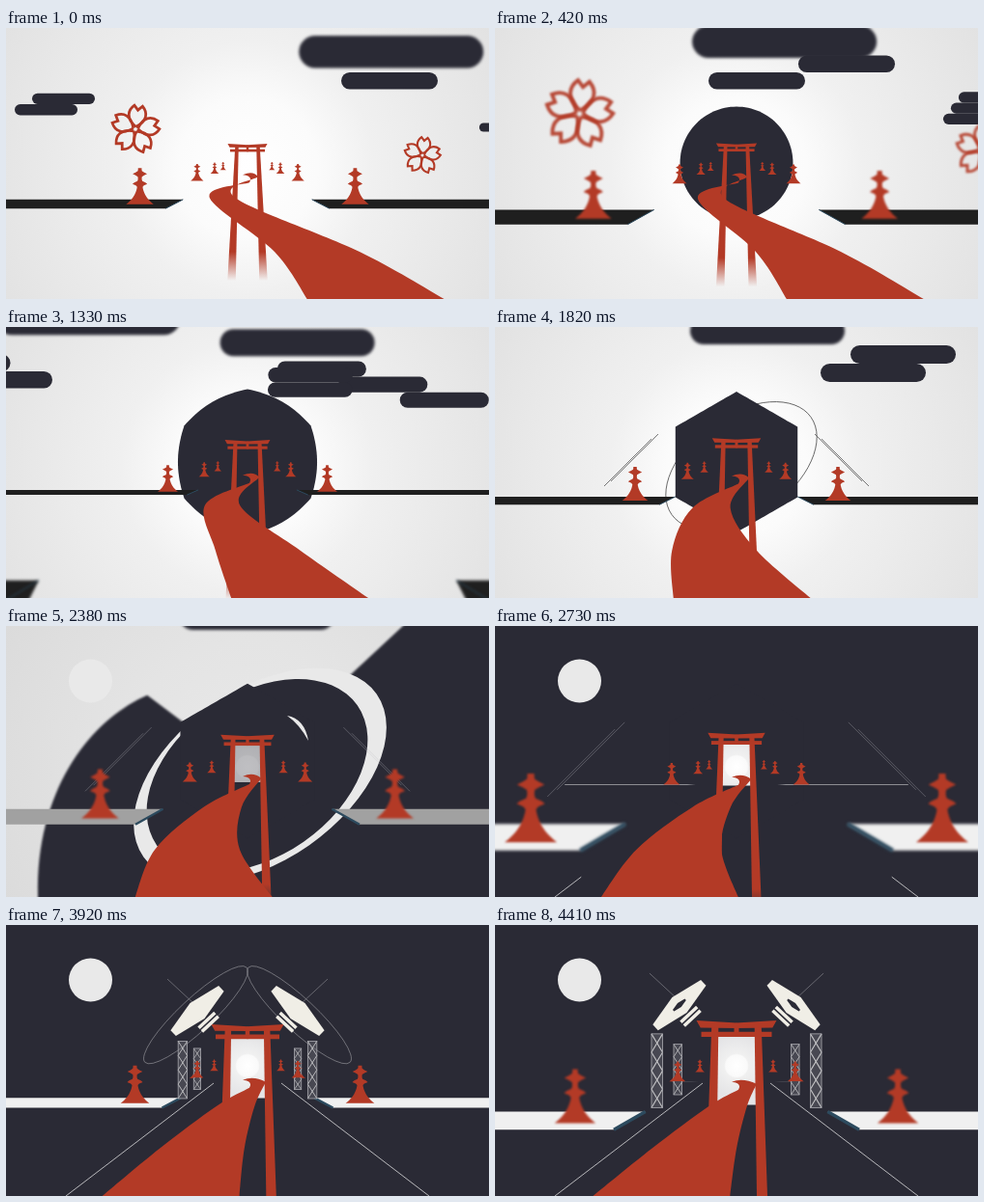
Write an HTML page with a canvas that moves like this. It is 500x281 px and loops after 4.48 s.

```html
<!DOCTYPE html>
<html lang="en">
<head>
<meta charset="utf-8">
<title>Torii road</title>
<style>
html, body { margin: 0; width: 100%; height: 100%; overflow: hidden; background: #e6e6e6 }
canvas { display: block }
</style>
</head>
<body>
<canvas id="stage" width="500" height="281"></canvas>
<script>
const c = document.getElementById('stage').getContext('2d');
const LOOP = 4480, STEP = 70, CX = 250, CY = 137, DEG = Math.PI / 180;
const RED = '#b33a26', DARK = '#2a2a35', CREAM = '#f0eee6';

const clamp = v => Math.max(0, Math.min(1, v));
const ramp = (t, from, to) => clamp((t - from) / (to - from));
const ease = (t, from, to) => ramp(t, from, to) ** 2 * (3 - 2 * ramp(t, from, to));
const mix = (a, b, k) => a + (b - a) * k;
const grey = (v, alpha = 1) => `rgba(${v},${v},${v},${alpha})`;

function poly(points, fill) {
  c.beginPath();
  points.forEach(p => c.lineTo(...p));
  c.closePath();
  c.fillStyle = fill;
  c.fill();
}

function line(x1, y1, x2, y2, color, width = 1) {
  c.beginPath();
  c.moveTo(x1, y1);
  c.lineTo(x2, y2);
  c.strokeStyle = color;
  c.lineWidth = width;
  c.stroke();
}

function oval(x, y, a, b, turn, fill) {
  c.beginPath();
  c.ellipse(x, y, a, b, turn, 0, 7);
  c.fillStyle = fill;
  c.fill();
}

function both(draw) {
  draw();
  c.save();
  c.translate(500, 0);
  c.scale(-1, 1);
  draw();
  c.restore();
}

function glow(y, r, stops) {
  const g = c.createRadialGradient(CX, y, 0, CX, y, r);
  stops.forEach(([k, color]) => g.addColorStop(k, color));
  return g;
}

// Smooth curve through the points, continuing the current path.
function through(p) {
  for (let i = 0; i < p.length - 1; i++) {
    const a = p[i - 1] || p[i], b = p[i], d = p[i + 1], e = p[i + 2] || d;
    c.bezierCurveTo(b[0] + (d[0] - a[0]) / 6, b[1] + (d[1] - a[1]) / 6,
      d[0] - (e[0] - b[0]) / 6, d[1] - (e[1] - b[1]) / 6, ...d);
  }
}

function drawGround(t) {
  const dim = ramp(t, 1850, 2350);
  c.fillStyle = glow(145, 290, [[0, grey(mix(255, 232, dim))], [.25, grey(mix(251, 230, dim))],
    [.45, grey(mix(240, 228, dim))], [1, grey(mix(226, 219, dim))]]);
  c.fillRect(0, 0, 500, 281);
}

// Banks of pills stacked upwards; each stands at x, y at the time `seen`.
const banks = [
  { seen: 0, x: 9, y: 79, w: 65, rows: 2, shift: 18, drift: -.3, grow: 0 },
  { seen: 840, x: 105, y: -13, w: 191, rows: 1, shift: 0, drift: -.236, grow: 0 },
  { seen: 840, x: 95, y: 46, w: 100, rows: 2, shift: 30, drift: -.3, grow: 0 },
  { seen: 840, x: 438, y: 79, w: 77, rows: 3, shift: -25, drift: -.137, grow: .0004 },
  { seen: 1820, x: 337, y: 38, w: 109, rows: 2, shift: 31, drift: .1, grow: .0004 },
  { seen: 1820, x: 202, y: -10, w: 160, rows: 1, shift: 0, drift: -.04, grow: 0 }
];

function drawClouds(t) {
  c.lineCap = 'round';
  for (const b of banks) {
    const dt = t - b.seen, s = 1 + dt * b.grow, h = .175 * b.w;
    if (dt < -900 || dt > 600) continue;
    c.filter = `blur(${h > 25 ? 1.4 : .6}px)`;
    for (let i = 0; i < b.rows; i++) {
      const x = CX + (b.x + i * b.shift - CX) * s + b.drift * dt * (1 + i / 2);
      const y = CY + (b.y + h / 2 - i * h - CY) * s - (b.rows < 2 ? dt * .025 : 0);
      line(x + h * s / 2, y, x + (b.w - h / 2) * s, y, DARK, h * s);
    }
  }
  c.filter = 'none';
  c.lineCap = 'butt';
}

// Thin outline that thickens to a band and bursts past the stage.
function drawRing(t) {
  if (t < 1400 || t > 2800) return;
  const p = (t - 1820) / 560, a = 88 * Math.exp(.515 * p ** 3), b = .6 * a;
  const x = 255 + 8 * p, y = 144 + 11 * p, turn = -35 * DEG;
  if (t < 2100) {
    c.beginPath();
    c.ellipse(x, y, a, b, turn, 0, 6.3 * ramp(t, 1400, 1750));
    c.strokeStyle = '#444';
    c.lineWidth = .8;
    c.stroke();
    return;
  }
  const k = ramp(t, 2100, 2380);
  oval(x, y, a, b, turn, '#e9e9e9');
  oval(x - 3, y, a * mix(.5, .86, k), b * mix(.5, .95, k), turn, DARK);
}

// Dark spiral that turns clockwise and swallows the light ground.
function drawNight(t) {
  if (t < 2200) return;
  const q = t - 2380, end = Math.min(360, 260 + q * .9), points = [[CX, 150]];
  for (let a = 0; a <= end; a += 2) {
    const r = 130 * Math.exp((end - a) * .0098) + Math.max(0, q) * 1.1, turn = (a - 43) * DEG;
    points.push([CX + r * Math.cos(turn), 150 + r * Math.sin(turn)]);
  }
  c.filter = 'blur(.8px)';
  poly(points, DARK);
  c.filter = 'none';
}

// Disc that straightens into a hexagon.
function drawCore(t) {
  if (t < 250 || t > 2800) return;
  const size = (1 - (1 - ramp(t, 250, 700)) ** 3) * (1 + .1 * ramp(t, 1820, 2380));
  const k = ramp(t, 1150, 1650), points = [];
  for (let a = 0; a < 360; a += 3) {
    const flat = 73 * Math.cos(30 * DEG) / Math.cos((a % 60 - 30) * DEG);
    const r = size * mix(77, flat, k), turn = (a - 90) * DEG;
    points.push([CX + r * Math.cos(turn), 140 + r * Math.sin(turn)]);
  }
  poly(points, DARK);
}

function drawMoon(t) {
  const r = 22.5 * ramp(t, 2170, 2350);
  oval(87.5, 57, r, r, 0, '#e9e9e9');
  if (t > 2300 && t < 2460) {
    c.beginPath();
    c.moveTo(291, 93);
    c.quadraticCurveTo(309, 96, 313, 119);
    c.quadraticCurveTo(304, 102, 291, 93);
    c.fill();
  }
}

function drawStreaks(t) {
  if (t > 1500 && t < 3900) {
    const s = 1 / (1 - (t - 1820) * .00033), l = 49 * ramp(t, 1500, 1750);
    const color = t < 2240 ? '#555' : 'rgba(190,190,195,.4)';
    both(() => {
      for (const [x, y] of [[-137, 28], [-130, 23]])
        line(CX + x * s, CY + y * s, CX + (x + l) * s, CY + (y - l) * s, color, t < 2900 ? .8 : 2.2);
    });
  }
  const reach = ramp(t, 2600, 3330);
  if (reach) both(() => line(62, 281, 62 + 153 * reach, 281 - 117 * reach, '#c9c9cb', .9));
}

// Sideways distance of a roadside thing at depth u.
const spread = u => 1 / (.0102 * u);

// Stone lantern: flared foot, two bulges for lamp and roof.
function drawLantern(d) {
  const h = .335 * d, x = CX - d, y = CY + .41 * d - h, right = [], left = [];
  for (let v = 0; v <= 1.001; v += .04) {
    const bulge = m => .15 * Math.exp(-(((v - m) / .045) ** 2));
    const w = (.05 + .33 * v ** 4 + bulge(.16) + bulge(.43)) * h;
    right.push([x + w, y + v * h]);
    left.unshift([x - w, y + v * h]);
  }
  c.filter = d > 130 ? `blur(${d * .006}px)` : 'none';
  poly([...right, ...left], RED);
  c.filter = 'none';
}

// Platform under a lantern: its upper edge lies a little deeper than the front one.
function drawLedge(u, t) {
  if (u > 1.62) return;
  const d = spread(u), back = spread(u + .12), night = ramp(t, 2200, 2490);
  const x1 = CX - .68 * back, x2 = CX - .76 * d, top = 140 + .386 * back;
  const h = (.45 * d - 3 - .386 * back) * Math.max(.15, clamp((1.6 - u) / .4));
  const out = Math.max(-20, x1 - (1.62 - u) * 850);
  if (d > 180) c.filter = 'blur(1.5px)';
  poly([[out, top], [x1, top], [Math.max(out, x2), top + h], [out, top + h]],
    grey(mix(31, 240, night), u > 1.4 ? .5 : 1));
  if (u < 1.3) line(x1, top, x2, top + h, '#2c4a5e', mix(1, .02 * d, night));
  c.filter = 'none';
}

function drawRoadside(t) {
  for (let i = t > 2500 ? 4 : 3; i >= 0; i--) {
    const u = .88 + i - .00052 * t;
    if (u > .12) both(() => {
      drawLedge(u, t);
      drawLantern(spread(u));
    });
  }
}

function drawPanels(t) {
  const k = ramp(t, 3500, 3800);
  if (!k) return;
  both(() => {
    for (const depth of [.0192, .0149]) {
      const d = 1 / (depth - (t - 3920) * 5.6e-6), w = .14 * d, x = CX - d - w / 2;
      const bottom = 138 + .625 * d, h = (bottom - 154 + .5 * d) * k, y = bottom - h;
      c.fillStyle = '#484852';
      c.fillRect(x, y, w, h);
      for (let i = 0; i < 4; i++) {
        const a = y + h * i / 4, b = a + h / 4;
        line(x, a, x + w, b, '#c5c5c7', d / 75);
        line(x + w, a, x, b, '#c5c5c7', d / 75);
      }
      c.strokeStyle = '#aaaab0';
      c.lineWidth = .8;
      c.strokeRect(x, y, w, h);
      if (depth > .015) drawLantern(d);
    }
  });
}

function drawWings(t) {
  const k = ramp(t, 3430, 3780), q = t - 3920;
  if (!k) return;
  const plate = (s, fill) => poly([[-34, 4], [0, 11], [34, 4], [34, -4], [0, -11], [-34, -4]]
    .map(([x, y]) => [x * s, y * s]), fill);
  both(() => {
    c.save();
    c.translate(198 - q * .0145, 89 - q * .0122);
    c.scale(k, k);
    line(-31, -33, -4, -8, '#77777e', .8);
    c.rotate(-43 * DEG);
    c.beginPath();
    c.ellipse(-4, 2, 72 + q / 16, 17 + q / 60, 0, 0, 7);
    c.strokeStyle = `rgba(160,160,165,${.7 * (1 - ramp(q, 30, 330))})`;
    c.lineWidth = .8;
    c.stroke();
    plate(1, CREAM);
    plate(.25 * ramp(q, 30, 380), DARK);
    for (const y of [14, 19]) line(-11, y, 12, y, CREAM, 3.5);
    c.restore();
  });
}

function drawGate(t, w) {
  const y = 140.5 - w, foot = 262 + t * .015, bar = (half, from, to) =>
    poly([[CX - half * w, y + from * w], [CX + .5, y + from * w], [CX + .5, y + to * w], [CX - half * w, y + to * w]], RED);
  c.globalAlpha = ramp(t, 2100, 2500);
  poly([[CX - .48 * w, y + .4 * w], [CX + .48 * w, y + .4 * w],
    [CX + .52 * w, 112 + 1.8 * w], [CX - .52 * w, 112 + 1.8 * w]],
    glow(146, 32, [[0, '#fff'], [.35, '#fafafa'], [.4, '#f0f0f0'], [1, '#e4e4e6']]));
  c.globalAlpha = 1;
  const fade = c.createLinearGradient(0, foot - 30, 0, foot);
  fade.addColorStop(0, RED);
  fade.addColorStop(1, 'rgba(179,58,38,0)');
  both(() => {
    poly([[CX - .62 * w, y + .1 * w], [CX - .45 * w, y + .1 * w],
      [CX - .45 * w - 3, foot], [CX - .62 * w - 8, foot]], fade);
    poly([[CX - w, y], [CX + .5, y + .06 * w], [CX + .5, y + .19 * w], [CX - .9 * w, y + .18 * w]], RED);
    bar(.88, .28, .41);
    bar(.06, .15, .3);
  });
}

// Winding road: three bends swing one after another, the width follows the depth.
function drawRoad(t, w) {
  const late = ease(t, 3000, 4300);
  const bends = [
    [224 + 17 * late, 176 + 12 * ease(t, 0, 2000)],
    [322 - 132 * ease(t, 0, 2800) + 16 * late, 232],
    [385 - 222 * ease(t, 0, 3300) + 8 * late, 283]
  ];
  const edge = side => bends.map(([x, y]) => [x + side * .55 * (y - 152), y]);
  const left = edge(-1).reverse(), y = 143 + .5 * w, tip = [251 + .48 * w, y + 1];
  c.beginPath();
  c.moveTo(245, y - 1);
  c.quadraticCurveTo(256, y - 6, ...tip);
  through([tip, ...edge(1)]);
  c.lineTo(...left[0]);
  through([...left, [252, y + 7]]);
  c.quadraticCurveTo(256, y, 245, y - 1);
  c.fillStyle = RED;
  c.fill();
}

function drawFlower(t, x, y, r) {
  const s = .88 / (.88 - .0006 * t);
  c.save();
  c.translate(CX + (x - CX) * s, 145 + (y - 145) * s);
  c.rotate(.13);
  c.scale(r * s, r * s);
  c.filter = t > 200 ? `blur(${s * .6}px)` : 'none';
  c.strokeStyle = RED;
  c.globalAlpha = 1 - .25 * ramp(t, 200, 800);
  c.lineWidth = .11;
  for (let i = 0; i < 5; i++) {
    c.rotate(72 * DEG);
    c.beginPath();
    c.moveTo(0, -.1);
    c.bezierCurveTo(-.45, -.4, -.42, -.75, -.17, -.98);
    c.lineTo(0, -.8);
    c.lineTo(.17, -.98);
    c.bezierCurveTo(.42, -.75, .45, -.4, 0, -.1);
    c.stroke();
  }
  c.restore();
}

function draw(t) {
  const w = 20.5 + .00109 * t + 8.3e-7 * t * t;
  drawGround(t);
  drawClouds(t);
  drawNight(t);
  drawRing(t);
  drawCore(t);
  drawMoon(t);
  drawStreaks(t);
  drawRoadside(t);
  drawPanels(t);
  drawGate(t, w);
  drawRoad(t, w);
  if (t < 1200) {
    drawFlower(t, 134, 105, 25);
    drawFlower(t, 431, 132, 19);
  }
  drawWings(t);
}

const start = performance.now();
function frame() {
  const t = Math.max(0, performance.now() - start) % LOOP;
  draw(Math.floor(t / STEP) * STEP);
  requestAnimationFrame(frame);
}
frame();
</script>
</body>
</html>
```
